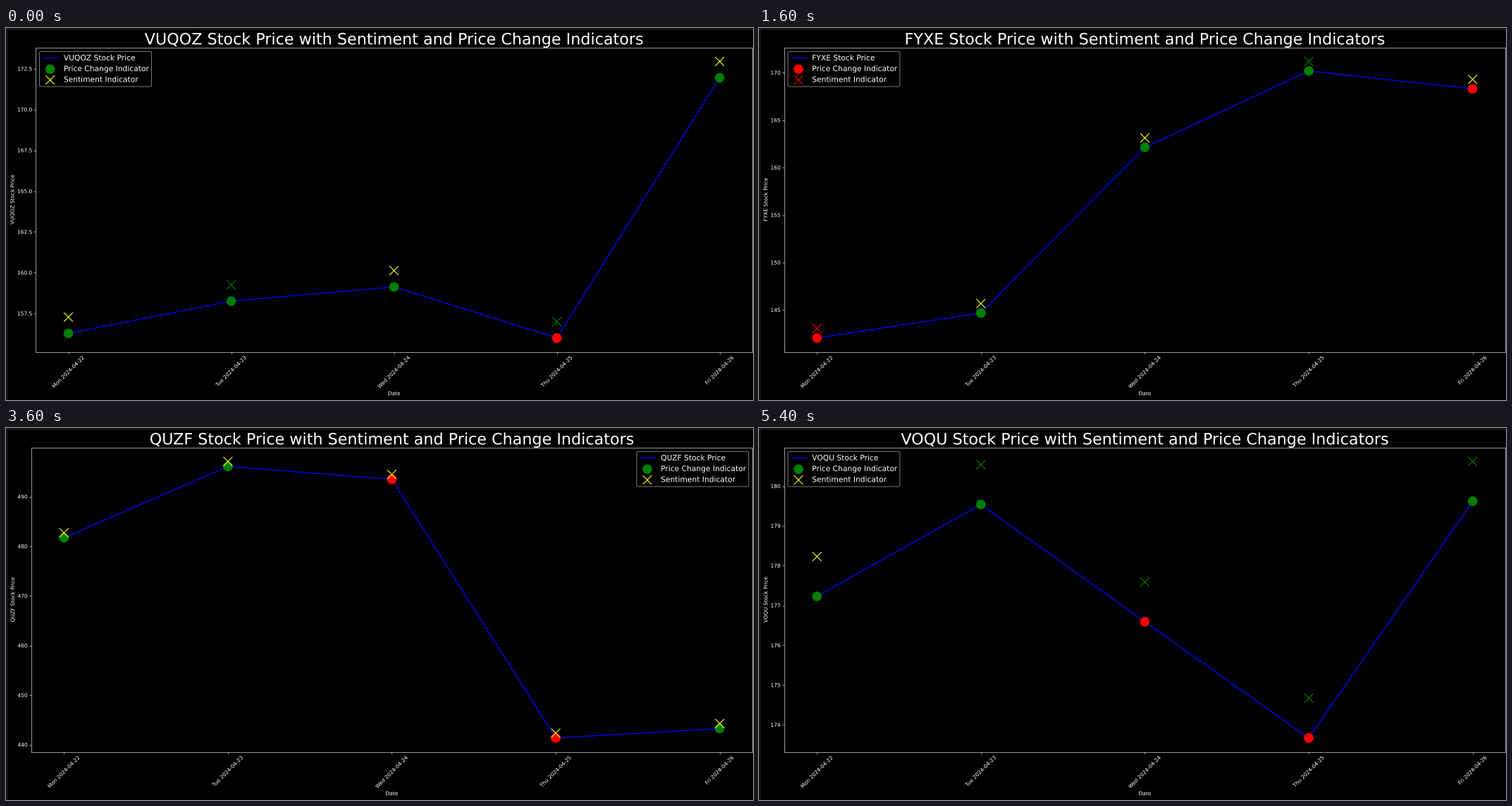
A matplotlib script that plays this animation: 1060x528 px, repeating every 5600 ms.

```python
import matplotlib.pyplot as plt
from matplotlib import patheffects
from matplotlib.animation import FuncAnimation
from matplotlib.lines import Line2D
from matplotlib.text import Text

WIDTH, HEIGHT, DPI = 1060, 528, 72  # at 72 dpi one point is one pixel
SCALE = 0.742
TOP, BOTTOM = 27.9, 459.6
STEP_MS, STEPS = 200, 28

DAYS = ["Mon 2024-04-22", "Tue 2024-04-23", "Wed 2024-04-24",
        "Thu 2024-04-25", "Fri 2024-04-26"]
COLORS = {"g": "green", "r": "red", "y": "yellow"}

# start step, ticker, closing prices, price change, sentiment, legend side, x extent
SLIDES = [
    (0, "VUQOZ", (156.28, 158.26, 159.13, 156.00, 171.95),
     "gggrg", "ygygy", "left", (42.3, 1058.9)),
    (2, "PZQY", (400.96, 407.57, 409.06, 399.04, 406.32),
     "gggrg", "gyygy", "right", (35.7, 1059.2)),
    (8, "FYXE", (142.05, 144.68, 162.13, 170.18, 168.29),
     "rgggr", "ryygy", "left", (35.7, 1059.2)),
    (14, "QUZF", (481.73, 496.10, 493.50, 441.38, 443.29),
     "ggrrg", "yyyyy", "right", (35.7, 1059.2)),
    (21, "XEPY", (165.84, 166.90, 169.02, 169.89, 169.30),
     "ggggr", "yryyg", "right", (35.2, 1058.7)),
    (27, "VOQU", (177.23, 179.54, 176.59, 173.67, 179.62),
     "ggrrg", "ygggg", "left", (35.7, 1059.2)),
]

plt.style.use("dark_background")
plt.rcParams.update({"font.family": "DejaVu Sans", "text.hinting": "none",
                     "toolbar": "None"})
for key in ("font.size", "axes.linewidth", "axes.labelpad", "axes.titlepad",
            "lines.linewidth", "patch.linewidth",
            "xtick.major.size", "xtick.major.width", "xtick.major.pad",
            "ytick.major.size", "ytick.major.width", "ytick.major.pad"):
    plt.rcParams[key] *= SCALE

fig = plt.figure(figsize=(WIDTH / DPI, HEIGHT / DPI), dpi=DPI)


def add_window_edge():
    for xs, ys in (((0.5, 0.5), (0, HEIGHT)), ((0, WIDTH), (HEIGHT - 0.5,) * 2)):
        fig.add_artist(Line2D([x / WIDTH for x in xs], [y / HEIGHT for y in ys],
                              color="#2c2c2c", linewidth=1))


def add_chart(ticker, prices, changes, moods, side, extent):
    left, right = extent
    ax = fig.add_axes((left / WIDTH, 1 - BOTTOM / HEIGHT,
                       (right - left) / WIDTH, (BOTTOM - TOP) / HEIGHT),
                      label=ticker)
    days = range(len(DAYS))
    size = 300 * SCALE ** 2
    ax.plot(days, prices, color="blue", linewidth=1.75 * SCALE,
            label=f"{ticker} Stock Price")
    ax.scatter(days, prices, s=size, c=[COLORS[c] for c in changes],
               zorder=3, label="Price Change Indicator")
    ax.scatter(days, [p + 1 for p in prices], s=size, marker="x",
               c=[COLORS[c] for c in moods], zorder=4,
               label="Sentiment Indicator")
    ax.set_xticks(days, DAYS, rotation=45)
    ax.set_xlabel("Date")
    ax.set_ylabel(f"{ticker} Stock Price")
    ax.set_title(f"{ticker} Stock Price with Sentiment and Price Change Indicators",
                 fontsize=30 * SCALE)
    legend = ax.legend(loc=f"upper {side}", fontsize=14.4 * SCALE,
                       labelspacing=0.44)
    legend.get_frame().set_snap(False)
    return ax


def smooth_text():
    """Draw text as outlines, so that it is not moved to whole pixels."""
    fig.draw_without_rendering()
    for text in fig.findobj(Text):
        text.set_path_effects([patheffects.Normal()])


add_window_edge()
starts = [slide[0] for slide in SLIDES]
charts = [add_chart(*slide[1:]) for slide in SLIDES]
smooth_text()


def update(step):
    current = sum(start <= step for start in starts) - 1
    for i, chart in enumerate(charts):
        chart.set_visible(i == current)
    return charts


anim = FuncAnimation(fig, update, frames=STEPS, interval=STEP_MS,
                     init_func=lambda: update(0), repeat=True, blit=False)
plt.show()
```
